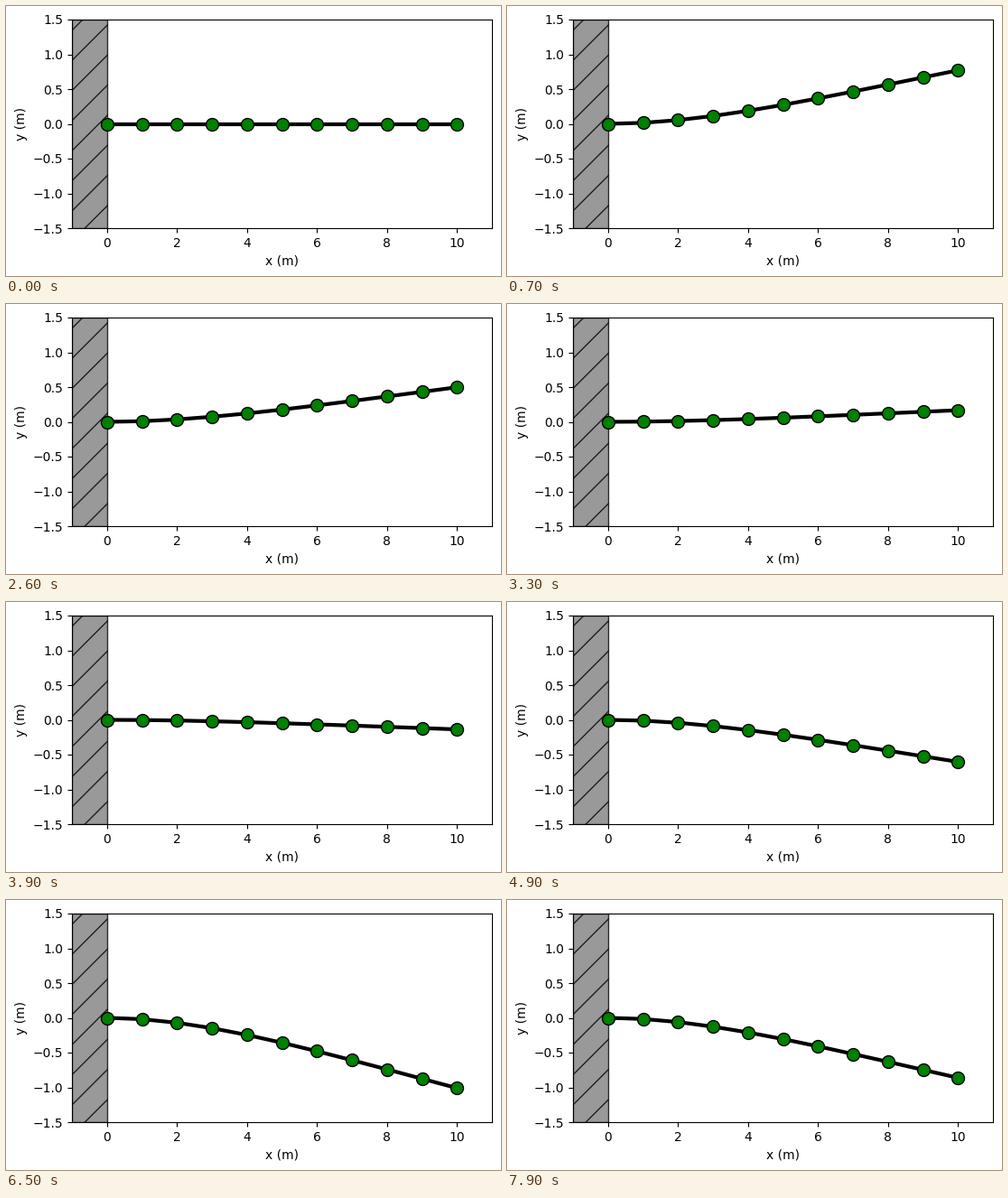
Animation, 548 px wide and 299 px high, one loop 8000 ms. Source, as a matplotlib script:

```python
import numpy as np
import matplotlib.pyplot as plt
from matplotlib.animation import FuncAnimation
from matplotlib.patches import Rectangle

W, H, DPI = 548, 299, 100
FRAMES, INTERVAL = 80, 100      # 8 s loop

LENGTH = 10.0                   # beam length (m)
FORCE = 1.051                   # static tip deflection at full load (m)
OMEGA = 0.5                     # load frequency (rad/s)
RATE = 2.0                      # viscoelastic relaxation rate (1/s)

x = np.linspace(0, LENGTH, 11)
s = x / LENGTH
shape = s**2 * (6 - 4 * s + s**2) / 3    # cantilever under uniform load


def tip(t):
    """First-order lag response to a cosine load, starting at rest."""
    lag = np.arctan2(OMEGA, RATE)
    gain = FORCE * np.cos(lag)
    return gain * (np.cos(OMEGA * t - lag) - np.cos(lag) * np.exp(-RATE * t))


fig = plt.figure(figsize=(W / DPI, H / DPI), dpi=DPI)
ax = fig.add_axes([73 / W, 53 / H, 465 / W, 231 / H])
ax.set(xlim=(-1, 11), ylim=(-1.5, 1.5), xlabel="x (m)", ylabel="y (m)")
ax.set_xticks(range(0, 11, 2))
ax.set_yticks(np.arange(-1.5, 1.6, 0.5))

ax.add_patch(Rectangle((-1, -1.5), 1, 3, facecolor="gray", edgecolor="black",
                       hatch="/", alpha=0.8))
beam, = ax.plot(x, 0 * x, "-o", color="black", lw=3, ms=10,
                mfc="green", mec="black", mew=1)


def update(i):
    beam.set_ydata(tip(i * INTERVAL / 1000) * shape)
    return beam,


anim = FuncAnimation(fig, update, frames=FRAMES, interval=INTERVAL,
                     repeat=True, repeat_delay=0)
plt.show()
```
